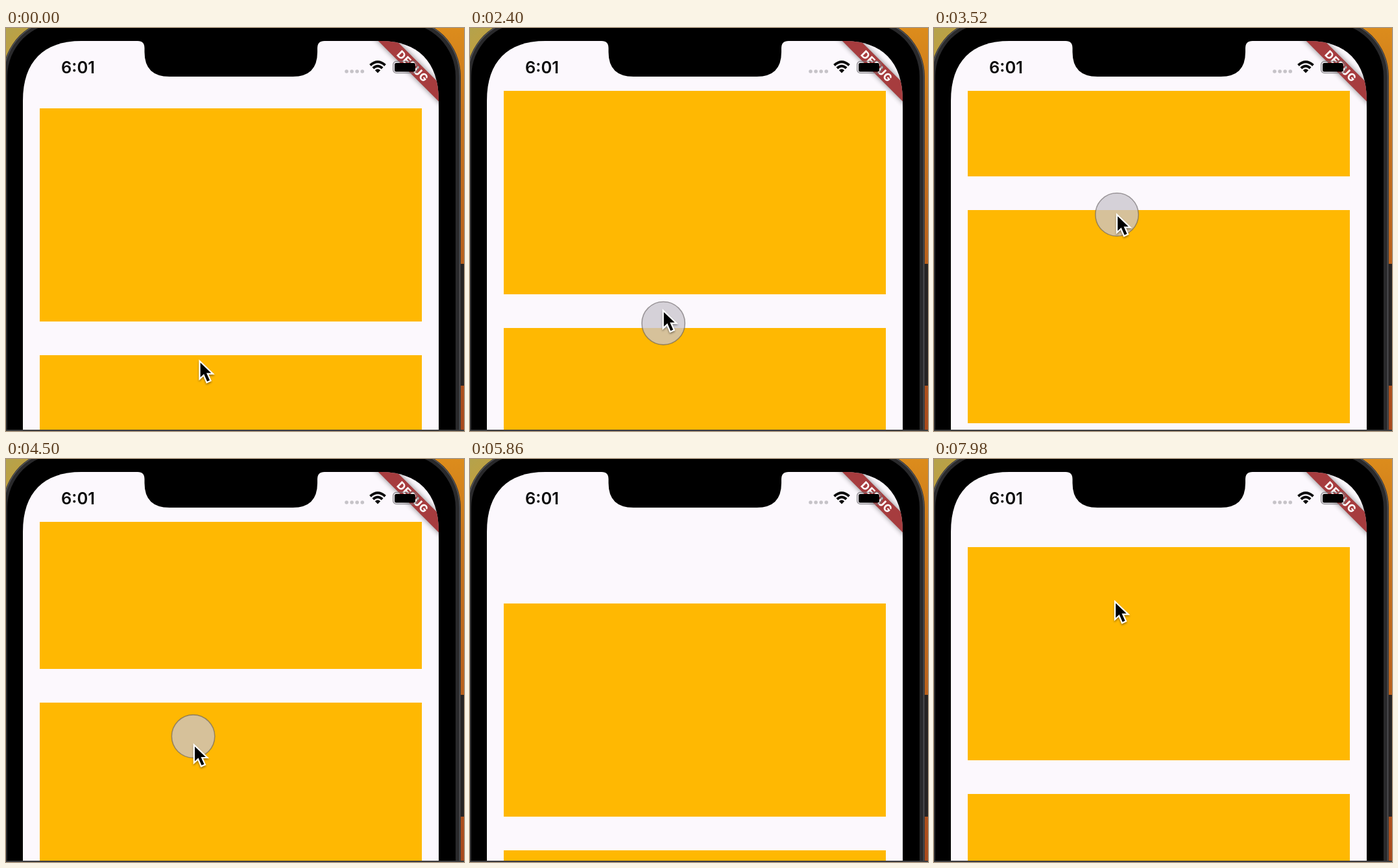
These frames come from a looping animation (706 px wide and 622 px high, 8 s). An HTML page:

```html
<!DOCTYPE html>
<html lang="en">
<head>
<meta charset="utf-8">
<title>Bouncing list</title>
<style>
  html, body { margin: 0; width: 100%; height: 100%; overflow: hidden; background: #000; }
  svg { display: block; width: 706px; height: 622px; }
  text { font-family: Inter, Roboto, sans-serif; text-anchor: middle; }
</style>
</head>
<body>
<svg viewBox="0 0 706 622">
  <defs>
    <linearGradient id="wallpaper" x2="0" y2="1">
      <stop offset="0" stop-color="#dc8c1c"/>
      <stop offset=".2" stop-color="#c8761c"/>
      <stop offset="1" stop-color="#a84a1c"/>
    </linearGradient>
    <linearGradient id="glow" x2="1" y2="1">
      <stop offset="0" stop-color="#b4a24c"/>
      <stop offset="1" stop-color="#d99a24"/>
    </linearGradient>
    <clipPath id="screen">
      <path id="display" d="M26 622V112C26 52 58 20 116 20H577C635 20 667 52 667 112V622Z"/>
    </clipPath>
    <clipPath id="viewport"><path d="M26 97H667V622H26Z"/></clipPath>
    <filter id="soft" x="-20%" y="-150%" width="140%" height="400%"><feGaussianBlur stdDeviation="4"/></filter>
    <filter id="drop" x="-50%" y="-50%" width="200%" height="200%">
      <feDropShadow dx="0" dy="2" stdDeviation="1.5" flood-opacity=".4"/>
    </filter>
  </defs>

  <rect width="706" height="622" fill="url(#wallpaper)"/>
  <rect width="90" height="80" fill="url(#glow)"/>
  <rect x="700" y="364" width="6" height="188" fill="#262424"/>

  <!-- phone body -->
  <rect x="-5" y="-15" width="706" height="900" rx="90" fill="#29292b"/>
  <rect x="-3.500" y="-13.500" width="703" height="900" rx="88" fill="none" stroke="#525254" stroke-width="1.600"/>
  <rect x="2" y="-8" width="691" height="900" rx="83"/>
  <use href="#display" fill="#fcf8fd"/>

  <g clip-path="url(#viewport)" fill="#ffb802">
    <g id="list">
      <rect x="52" width="589" height="329"/>
      <rect x="52" y="381" width="589" height="329"/>
    </g>
  </g>

  <g clip-path="url(#screen)">
    <g transform="translate(627.7 59.7) rotate(45)">
      <rect x="-100" y="-10" width="200" height="20" filter="url(#soft)" opacity=".5"/>
      <rect x="-100" y="-10" width="200" height="20" fill="#a63c3e"/>
      <text x="-1" y="6" font-size="16.500" font-weight="800" letter-spacing=".7" fill="#fff">DEBUG</text>
    </g>
  </g>
  <path d="M203 19V20Q213.500 20 213.500 31V37Q213.500 75 252 75H442Q480 75 480 37V31Q480 20 491 20V19Z"/>

  <!-- status bar -->
  <text x="111" y="70" font-size="25.500" font-weight="600" fill="#0a0a0a">6:01</text>
  <path d="M525 67h24.600" stroke="#c6c3c8" stroke-width="5.600" stroke-linecap="round" stroke-dasharray="0 8.100"/>
  <g fill="none" stroke="#0a0a0a" stroke-width="4">
    <path d="M561.500 57.500Q573 47 584.500 57.500"/>
    <path d="M565.800 62Q573 55.500 580.200 62"/>
    <path d="M568.800 65.200Q573 61.500 577.200 65.200L573 69.600Z" fill="#0a0a0a" stroke="none"/>
  </g>
  <rect x="596.800" y="51.500" width="37" height="18" rx="5" fill="none" stroke="#77757a" stroke-opacity=".75" stroke-width="1.600"/>
  <rect x="599" y="54" width="32" height="13.500" rx="2.500"/>
  <path d="M635.500 57.500q3 3 0 6z" fill="#77757a"/>

  <circle id="touch" r="33.200" fill="rgb(200 196 204 / .75)" stroke="rgb(100 96 98 / .6)" stroke-width="1.600"/>
  <path id="pointer" d="M1 1V28.500L7.200 22.800 12 34 18 31.300 13.200 20.700H21.500Z"
    stroke="#fff" stroke-width="2.200" filter="url(#drop)"/>
  <path d="M0 621H706" stroke="#3c3c3e" stroke-width="2"/>
</svg>
<script>
const LOOP = 8000, PRESS = 1500, RELEASE = 7560, TOUCH_LAG = 70;
const REST = 124, SCROLLED = -100;
const element = id => document.getElementById(id);
const list = element('list'), touch = element('touch'), pointer = element('pointer');

function progress(t, start, end) {
  const u = Math.min(1, Math.max(0, (t - start) / (end - start)));
  return u * u * (3 - 2 * u);
}

// Settle on the card, drag up, pull steadily down past the edge, then come back
function pointerAt(t) {
  const up = progress(t, 1920, 3090), back = progress(t, RELEASE, 7980);
  const pull = Math.max(0, Math.min(t, RELEASE) - 3690);
  const x = 298.5 - 16.5 * up ** 3 + Math.min(26, 1.2e-5 * pull ** 2);
  const y = 514 + 8 * progress(t, 900, 1400) - 234 * up + 0.189 * pull;
  return [x + (279 - x) * back, y + (220 - y) * back];
}

// Pulling past the top meets growing resistance
const rubberBand = distance => distance / (1 + distance / 226);

function draggedTop(t) {
  const up = progress(t, 2080, 3244), pull = Math.max(0, t - 4075) * 0.2235;
  const top = REST + (SCROLLED - REST) * up + pull;
  return top > REST ? REST + rubberBand(top - REST) : top;
}

function listTop(t) {
  if (t <= RELEASE) return draggedTop(t);
  const z = (t - RELEASE) / 98;
  return REST + (draggedTop(RELEASE) - REST) * (1 + z) * Math.exp(-z);
}

function place(node, [x, y]) {
  node.setAttribute('transform', `translate(${x} ${y})`);
}

function draw(now) {
  const t = now % LOOP;
  place(list, [0, Math.round(listTop(t))]);
  place(pointer, pointerAt(t).map(v => v - 1));
  place(touch, pointerAt(t - TOUCH_LAG));
  touch.setAttribute('visibility', t >= PRESS && t < RELEASE ? 'visible' : 'hidden');
  requestAnimationFrame(draw);
}
requestAnimationFrame(draw);
</script>
</body>
</html>
```
